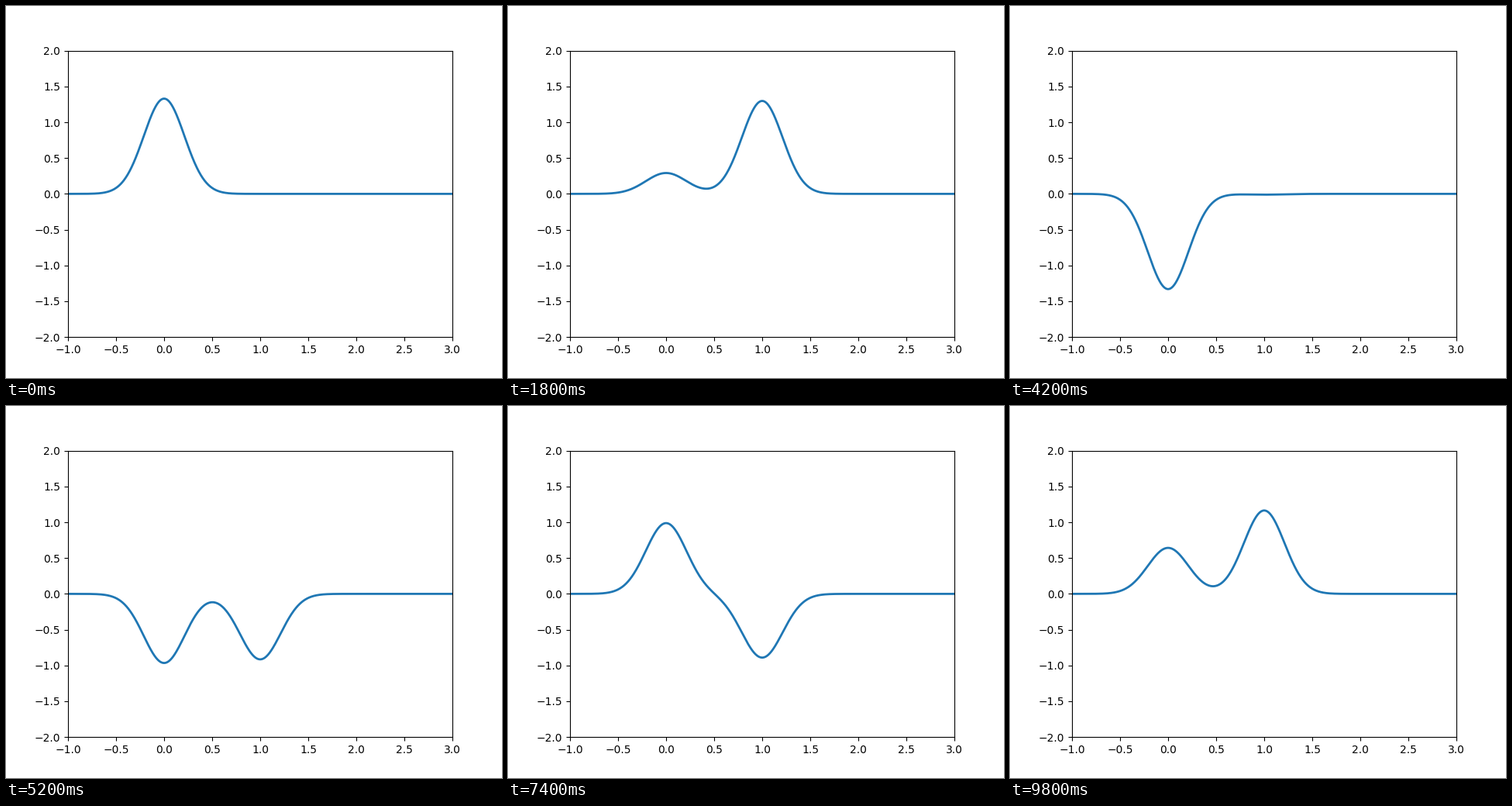
Recreate the animation shown at these times as a matplotlib script. Size 640 by 480 pixels, loop 10000 ms.

```python
import numpy as np
import matplotlib.pyplot as plt
from matplotlib.animation import FuncAnimation

FRAMES = 50
INTERVAL = 200   # ms
STEP = 0.15      # phase advance per frame, rad
WIDTH = 0.3

plt.rcParams["font.family"] = "DejaVu Sans"


def bump(x, center):
    peak = 1 / (WIDTH * np.sqrt(2 * np.pi))
    return peak * np.exp(-((x - center) / WIDTH) ** 2)


fig = plt.figure(figsize=(6.4, 4.8), dpi=100)
ax = fig.add_subplot(xlim=(-1, 3), ylim=(-2, 2))

x = np.linspace(-1, 3, 1000)
left, right = bump(x, 0), bump(x, 1)
line, = ax.plot(x, left, lw=2)


def update(i):
    phase = STEP * i
    line.set_ydata(np.cos(phase) * left + np.sin(phase) * right)
    return line,


anim = FuncAnimation(fig, update, frames=FRAMES, interval=INTERVAL,
                     repeat=True, repeat_delay=0)
plt.show()
```
